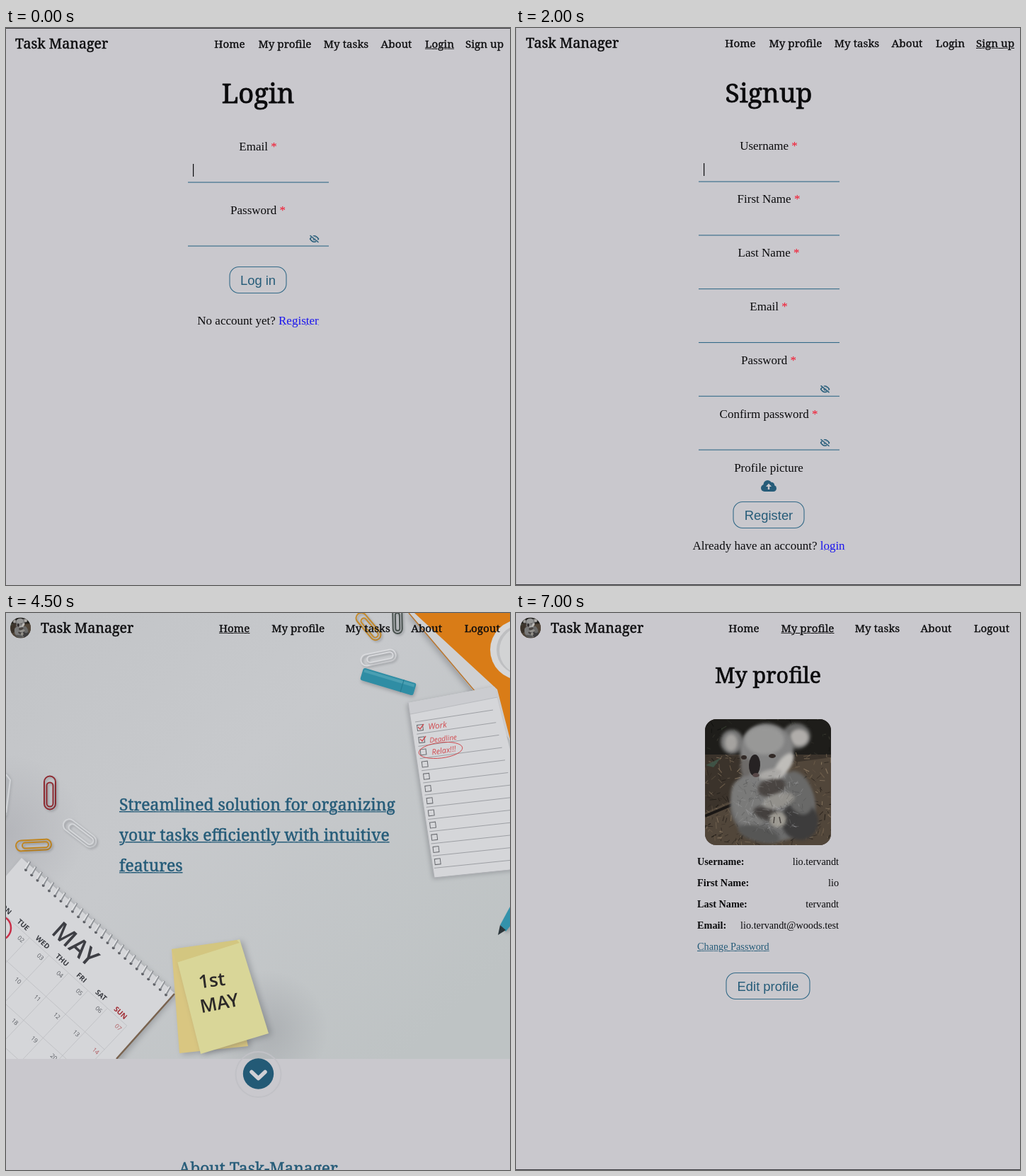
These frames come from a looping animation (712x787 px, 8000 ms). An HTML page with a canvas:

```html
<!DOCTYPE html>
<html lang="en">
<head>
<meta charset="utf-8">
<title>Task Manager</title>
<style>
html, body { margin: 0; width: 100%; height: 100%; overflow: hidden; background: #c9c8cd; }
canvas { display: block; width: 712px; height: 787px; }
</style>
</head>
<body>
<canvas id="stage"></canvas>
<script>
const W = 712, H = 787, LOOP = 8000;
const BG = '#c9c8cd', BLUE = '#265c79', INK = '#0b0b0d', RED = '#f5142c';
const DISPLAY = '"Noto Serif", serif';
const BODY = '"Liberation Serif", "Times New Roman", serif';
const SANS = '"Liberation Sans", Arial, sans-serif';
const HAND = '"Open Sans", sans-serif';

const canvas = document.getElementById('stage');
const ratio = window.devicePixelRatio || 1;
canvas.width = W * ratio;
canvas.height = H * ratio;
const ctx = canvas.getContext('2d');

function rect(x, y, w, h, color) {
  ctx.fillStyle = color;
  ctx.fillRect(x, y, w, h);
}

function trace(points, closed) {
  ctx.beginPath();
  points.forEach(([x, y]) => ctx.lineTo(x, y));
  if (closed) ctx.closePath();
}

function poly(color, ...points) {
  trace(points, true);
  ctx.fillStyle = color;
  ctx.fill();
}

function line(color, width, ...points) {
  trace(points);
  ctx.strokeStyle = color;
  ctx.lineWidth = width;
  ctx.stroke();
}

function oval(color, x, y, rx, ry = rx, turn = 0, stroke = 0) {
  ctx.beginPath();
  ctx.ellipse(x, y, rx, ry, turn, 0, Math.PI * 2);
  if (stroke) {
    ctx.strokeStyle = color;
    ctx.lineWidth = stroke;
    ctx.stroke();
  } else {
    ctx.fillStyle = color;
    ctx.fill();
  }
}

function at(x, y, turn, draw) {
  ctx.save();
  ctx.translate(x, y);
  ctx.rotate(turn);
  draw();
  ctx.restore();
}

function withShadow(blur, dx, dy, draw) {
  ctx.save();
  ctx.shadowColor = 'rgba(60, 62, 70, .3)';
  ctx.shadowBlur = blur * ratio;
  ctx.shadowOffsetX = dx * ratio;
  ctx.shadowOffsetY = dy * ratio;
  draw();
  ctx.restore();
}

// Draws text and returns its width; underlines leave gaps around descenders.
function text(str, x, y, font, { color = INK, align = 'left', underline = 0, behind = BG } = {}) {
  ctx.font = font;
  ctx.textAlign = 'left';
  const width = ctx.measureText(str).width;
  const left = x - (align === 'center' ? width / 2 : align === 'right' ? width : 0);
  if (underline) {
    const top = Math.round(y + .8);
    rect(left, top, width, underline, color);
    ctx.save();
    ctx.beginPath();
    ctx.rect(left, top - .5, width, underline + 1);
    ctx.clip();
    ctx.strokeStyle = behind;
    ctx.lineWidth = 2.5;
    ctx.strokeText(str, left, y);
    ctx.restore();
  }
  ctx.fillStyle = color;
  ctx.fillText(str, left, y);
  if (font.endsWith(DISPLAY)) {
    // The display face is a little heavier than the regular weight.
    ctx.strokeStyle = color;
    ctx.lineWidth = parseFloat(font) * .022;
    ctx.strokeText(str, left, y);
  }
  return width;
}

function turned(str, x, y, turn, font, color) {
  at(x, y, turn, () => text(str, 0, 0, font, { color, align: 'center' }));
}

function rng(seed) {
  return () => (seed = seed * 16807 % 2147483647) / 2147483647;
}

function nav(items, active, y, behind) {
  for (const [label, x] of items) {
    text(label, x, y, '15.2px ' + DISPLAY,
      { align: 'center', underline: label === active ? 1 : 0, behind });
  }
}

function title(str, x, y, size) {
  text(str, x, y, `${size}px ${DISPLAY}`, { align: 'center' });
}

function eyeSlash(x, y) {
  ctx.lineCap = 'round';
  ctx.beginPath();
  ctx.moveTo(x - 6, y);
  ctx.quadraticCurveTo(x, y - 8.5, x + 6, y);
  ctx.quadraticCurveTo(x, y + 8.5, x - 6, y);
  ctx.strokeStyle = BLUE;
  ctx.lineWidth = 1.5;
  ctx.stroke();
  oval(BLUE, x + .3, y, 2.3);
  line(BG, 3, [x - 5, y - 5], [x + 5.5, y + 4]);
  line(BLUE, 1.5, [x - 5.5, y - 4.5], [x + 5.5, y + 4.5]);
  ctx.lineCap = 'butt';
}

function cloud(x, y) {
  oval(BLUE, x - 6, y + 3, 5);
  oval(BLUE, x - 1.5, y - 2, 6);
  oval(BLUE, x + 4, y - 1, 4.2);
  oval(BLUE, x + 6.5, y + 3.5, 4.5);
  rect(x - 6, y, 12.5, 8, BLUE);
  poly(BG, [x, y - 3.5], [x + 4, y + 1], [x - 4, y + 1]);
  rect(x - 1.2, y, 2.4, 5, BG);
}

function button(label, x, y, w) {
  ctx.beginPath();
  ctx.roundRect(x, y, w, 37, 13);
  ctx.strokeStyle = '#336a88';
  ctx.lineWidth = 1.1;
  ctx.stroke();
  text(label, x + w / 2, y + 25, '18.4px ' + SANS, { color: BLUE, align: 'center' });
}

function pair(first, second, x, y, style) {
  const font = '17px ' + BODY;
  ctx.font = font;
  const left = x - ctx.measureText(first + second).width / 2;
  const width = text(first, left, y, font);
  text(second, left + width, y, font, style);
}

function field(label, x, y, secret) {
  pair(label + ' ', '*', x, y, { color: RED });
  rect(x - 99, y + 45, 199, 1.1, '#336a88');
  if (secret) eyeSlash(x + 79.5, y + 35.5);
}

const link = { color: '#1a14ee', underline: 1 };

const guestNav = dx => [['Home', 317 + dx], ['My profile', 395 + dx], ['My tasks', 481.5 + dx],
  ['About', 552.5 + dx], ['Login', 613.5 + dx], ['Sign up', 677 + dx]];
const userNav = dx => [['Home', 322 + dx], ['My profile', 412 + dx], ['My tasks', 510.5 + dx],
  ['About', 593.5 + dx], ['Logout', 672 + dx]];

function brand(x, y) {
  text('Task Manager', x, y, '19.6px ' + DISPLAY);
}

function login() {
  rect(0, 0, W, 1, '#3b3b40');
  brand(13, 29);
  nav(guestNav(-1), 'Login', 28);
  title('Login', 356, 106, 38);
  field('Email', 356, 172.5);
  rect(264, 192, 1.2, 18, INK);
  field('Password', 356, 262.5, true);
  button('Log in', 316, 337.5, 80);
  pair('No account yet? ', 'Register', 356, 418.5, link);
}

function signup() {
  rect(0, 0, 1, H, '#bcbbc1');
  rect(0, H - 1, W, 1, '#3b3b40');
  brand(14, 28);
  nav(guestNav(0), 'Sign up', 27);
  title('Signup', 357, 105, 37.3);
  ['Username', 'First Name', 'Last Name', 'Email', 'Password', 'Confirm password']
    .forEach((label, i) => field(label, 357, 171.5 + i * 75.8, i > 3));
  rect(265, 191, 1.2, 18, INK);
  text('Profile picture', 357, 626.5, '17px ' + BODY, { align: 'center' });
  cloud(357, 647);
  button('Register', 307, 669.5, 100);
  pair('Already have an account? ', 'login', 357, 736.5, link);
}

// A koala sitting on dry grass, in a box of 178 units.
function koala() {
  const rand = rng(77);
  const strokes = (count, colors, spot) => {
    for (let i = 0; i < count; i++) {
      const [x, y] = spot();
      const turn = rand() * 6.28, length = 3 + rand() * 7;
      line(colors[i % colors.length], .4 + rand() * .8,
        [x, y], [x + Math.cos(turn) * length, y + Math.sin(turn) * length]);
    }
  };
  const soften = radius => ctx.filter = `blur(${radius * ratio * ctx.getTransform().a / ratio}px)`;

  rect(0, 0, 178, 178, '#3b332b');
  rect(0, 0, 178, 50, '#1e1d1a');
  poly('#51463a', [118, 62], [178, 54], [178, 178], [0, 178], [0, 132], [60, 105]);
  strokes(420, ['#6d5d4a', '#231e19', '#84735d', '#332b24'], () => [rand() * 178, 52 + rand() * 126]);
  strokes(50, ['#30382b', '#121210', '#403f35'], () => [rand() * 178, rand() * 48]);
  poly('#3f5245', [1, 65], [22, 55], [12, 68]);
  line('#1a1715', 4, [0, 137], [45, 118]);

  soften(2);
  oval('#6c6c6c', 96, 124, 60, 49);
  oval('#7d7d7d', 86, 100, 42, 34);
  oval('#3d3c3c', 134, 144, 26, 27, -.5);
  oval('#7a7a79', 60, 122, 21, 38, -.35);
  oval('#696968', 132, 104, 19, 32, -.35);
  oval('#4a4542', 94, 96, 20, 13, -.3);
  oval('#44403e', 88, 134, 20, 9, .3);
  oval('#93918c', 104, 115, 23, 10, -.25);
  oval('#9d9a92', 103, 142, 12, 11);
  oval('#565655', 76, 162, 30, 11, .25);
  oval('#777777', 38, 32, 16, 17);
  oval('#a5a3a0', 37, 33, 9, 12);
  oval('#6a6a69', 129, 24, 20, 18);
  oval('#b0adaa', 133, 26, 13, 12);
  oval('#838383', 87, 44, 38, 38);
  oval('#989897', 84, 30, 28, 20);
  oval('#bfbdb9', 111, 66, 9, 21, .6);
  oval('#aaa8a5', 92, 78, 17, 7, -.2);
  oval('#6d6a68', 58, 68, 8, 13);
  soften(.7);
  oval('#322a27', 55, 54, 4, 3);
  oval('#322a27', 95, 52, 5, 3);
  oval('#262223', 70, 65, 8, 15, .05);
  oval('#574848', 72, 79, 5, 3);
  line('#4a4542', 1.5, [98, 138], [97, 147]);
  line('#4a4542', 1.5, [105, 138], [107, 147]);
  ctx.filter = 'none';

  ctx.globalAlpha = .3;
  strokes(220, ['#b9babc', '#3c3c3d'], () => {
    const turn = rand() * 6.28, reach = Math.sqrt(rand());
    return [94 + Math.cos(turn) * reach * 50, 119 + Math.sin(turn) * reach * 46];
  });
  ctx.globalAlpha = 1;
}

function portrait(x, y, size, radius) {
  ctx.save();
  ctx.beginPath();
  ctx.roundRect(x, y, size, size, radius);
  ctx.clip();
  ctx.translate(x, y);
  ctx.scale(size / 178, size / 178);
  koala();
  ctx.restore();
}

function clip(x, y, turn, length, width, color) {
  const a = length / 2, b = width / 2;
  withShadow(3, 2, 2, () => at(x, y, turn, () => {
    ctx.strokeStyle = color;
    ctx.lineWidth = 2;
    ctx.beginPath();
    ctx.roundRect(-a, -b, length, width, b);
    ctx.stroke();
    ctx.beginPath();
    ctx.roundRect(-a + 9, -b + 3.5, length - 13, width - 7, b - 3.5);
    ctx.stroke();
  }));
}

function notepad() {
  withShadow(6, -2, 2, () =>
    poly('#d5d6d9', [568, 127], [690, 104], [720, 225], [720, 362], [605, 374]));
  poly('#cbccd0', [568, 127], [690, 104], [694, 119], [571, 143]);
  line('#b9bbbf', 1, [571, 143], [694, 119]);
  line('#aeb0b4', 1.2, [568, 127], [605, 374], [712, 363]);
  for (let i = 0; i < 13; i++) {
    const x = 578 + i * 2.25, y = 154 + i * 17.2;
    line('#8f9196', .8, [x, y], [Math.min(W, x + 110 + i * 2), y - 17 + i * .5]);
    if (i < 12) at(x + 7, y + 8, -.12, () => {
      ctx.strokeStyle = '#66686d';
      ctx.lineWidth = 1;
      ctx.strokeRect(-4, -4, 8, 8);
    });
  }
  const red = '#d0494e';
  line(red, 1.3, [582, 161], [585, 164], [590, 157]);
  line(red, 1.3, [585, 178], [588, 181], [593, 174]);
  turned('Work', 610, 163, -.12, 'italic 11.5px ' + HAND, red);
  turned('Deadline', 618, 181, -.12, 'italic 10px ' + HAND, red);
  turned('Relax!!!', 619, 198, -.15, 'italic 11px ' + HAND, red);
  oval(red, 614, 194, 31, 11, -.12, 1);
}

function calendar() {
  withShadow(8, 3, 3, () =>
    poly('#d5d6d9', [22, 346], [238, 537], [155, 633], [-4, 633], [-4, 376]));
  line('#79634f', 2.5, [238, 538], [156, 630]);
  const turn = .735, step = [27.5, 24.9], drop = [-31.7, 33.5];
  const cell = (x, y, c, r) => [x + c * step[0] + r * drop[0], y + c * step[1] + r * drop[1]];
  for (let i = 0; i < 6; i++) {
    line('#bbbdc1', .8, cell(33, 459, i, 0), cell(33, 459, i, 6));
    line('#bbbdc1', .8, cell(6, 434, -1, i), cell(6, 434, 6, i));
  }
  ['MON', 'TUE', 'WED', 'THU', 'FRI', 'SAT', 'SUN'].forEach((day, i) => {
    const [x, y] = cell(25, 440, i - 1, 0);
    turned(day, x - 3, y + 3, turn, 'bold 10px ' + HAND, day === 'SUN' ? '#a02b32' : '#393b41');
  });
  for (let day = 2; day < 29; day++) {
    const row = Math.floor((day - 1) / 7), column = day - 2 - row * 7;
    const [x, y] = cell(21, 461, column, row);
    turned(String(day).padStart(2, '0'), x - 2, y + 2, turn, '8.5px ' + HAND,
      column === 5 ? '#b05a5e' : '#5a5d63');
  }
  turned('MAY', 90, 477, turn, '600 35px ' + HAND, '#3d3e44');
  oval('#c92f48', -9, 445, 16, 17, 0, 2.5);
  for (let i = 0; i < 25; i++) {
    const x = 31 + i * 8.25, y = 358 + i * 7.35;
    oval('#5d5f65', x - 3, y + 5, 2);
    line('#8d9095', 3.2, [x - 3, y + 4], [x + 3, y - 7]);
    line('#e2e3e5', 1.8, [x - 4, y + 3], [x + 2, y - 7]);
  }
}

function stickyNotes() {
  withShadow(9, 4, 2, () => {
    poly('#d9c681', [234, 475], [310, 466], [342, 612], [245, 622]);
    poly('#d9d698', [241, 488], [330, 461], [371, 594], [275, 623]);
  });
  poly('#d3c680', [234, 475], [326, 462], [330, 466], [241, 494]);
  const ink = '#2c2928';
  turned('1st', 292, 528, -.13, '600 26px ' + HAND, ink);
  turned('MAY', 303, 560, -.19, '600 26px ' + HAND, ink);
}

function shade(x, y, radius, color) {
  const glow = ctx.createRadialGradient(x, y, 0, x, y, radius);
  glow.addColorStop(0, `rgba(${color}, .25)`);
  glow.addColorStop(1, `rgba(${color}, 0)`);
  rect(x - radius, y - radius, radius * 2, radius * 2, glow);
}

function desk() {
  ctx.save();
  ctx.beginPath();
  ctx.rect(0, 0, W, 630);
  ctx.clip();
  const light = ctx.createLinearGradient(0, 0, 560, 630);
  light.addColorStop(0, '#c2c4c7');
  light.addColorStop(.45, '#c7c9cc');
  light.addColorStop(1, '#bec3c4');
  rect(0, 0, W, 630, light);
  shade(370, 590, 85, '110, 112, 120');
  shade(0, 310, 110, '130, 130, 140');

  withShadow(8, -3, 3, () => poly('#cfd0d2', [569, 0], [712, 0], [712, 180], [662, 112]));
  poly('#d97c17', [577, 0], [712, 0], [712, 178], [694, 108]);
  line('#b8742c', 1.5, [569, 0], [662, 110]);
  oval('#d6d6d7', 726.5, 52, 42.5);
  oval('#bebfc1', 728, 52, 35);
  oval('#d2d3d4', 731, 53, 34);

  clip(512, 19, .87, 46, 15, '#c58b2c');
  clip(553, 10, 1.55, 38, 13, '#49534f');
  clip(526, 63, -.2, 50, 16, '#d9dadd');
  clip(62, 254, 1.57, 47, 16, '#8f2b32');
  clip(104, 311, .65, 54, 17, '#d4d6d9');
  clip(39, 328, -.05, 50, 15, '#c08520');
  withShadow(5, 1, 3, () => at(540, 97, .29, () => {
    ctx.beginPath();
    ctx.roundRect(-39, -9, 78, 18, 3);
    ctx.fillStyle = '#2f8da4';
    ctx.fill();
  }));
  at(540, 97, .29, () => {
    rect(-37, -7, 74, 4, '#4a9fb2');
    rect(20, -9, 1, 18, '#237a8f');
  });
  withShadow(5, -1, 2, () => poly('#b3b6ba', [-4, 225], [4, 228], [8, 236], [2, 285], [-4, 292]));
  line('#d2d4d7', 2, [0, 228], [6, 236], [0, 282]);
  withShadow(5, 2, 3, () => poly('#3392ab', [712, 415], [698, 441], [706, 450], [714, 440]));
  poly('#2b363b', [698, 441], [695, 455], [706, 448]);
  notepad();
  calendar();
  stickyNotes();
  ctx.restore();
}

function home() {
  const photo = '#c6c8cb';
  desk();
  portrait(6, 6.5, 29, 14.5);
  brand(49, 28);
  nav(userNav(.7), 'Home', 27, photo);
  ['Streamlined solution for organizing', 'your tasks efficiently with intuitive', 'features']
    .forEach((row, i) => text(row, 160, 279 + i * 43, '22.9px ' + DISPLAY,
      { color: BLUE, underline: 1.5, behind: photo }));
  oval('#c1c1c6', 356.5, 652, 32, 32, 0, 2);
  oval('#235a76', 356.5, 651, 21.7);
  ctx.lineCap = ctx.lineJoin = 'round';
  line('#d0d0d5', 5.5, [347, 648.5], [356.5, 657.5], [366, 648.5]);
  ctx.lineCap = 'butt';
  ctx.lineJoin = 'miter';
  text('About Task-Manager', 356.5, 793, '22.7px ' + DISPLAY, { color: BLUE, align: 'center' });
}

function profile() {
  rect(0, H - 1, W, 1, '#3b3b40');
  portrait(6, 6.5, 29, 14.5);
  brand(49, 28);
  nav(userNav(0), 'My profile', 27);
  title('My profile', 356, 99, 30.4);
  portrait(267, 150, 178, 16);
  [['Username:', 'lio.tervandt'], ['First Name:', 'lio'], ['Last Name:', 'tervandt'],
    ['Email:', 'lio.tervandt@woods.test']].forEach(([label, value], i) => {
    const y = 355.5 + i * 30.2;
    text(label, 256, y, 'bold 14.25px ' + BODY);
    text(value, 456, y, '14.25px ' + BODY, { align: 'right' });
  });
  text('Change Password', 256, 476.3, '14.25px ' + BODY, { color: BLUE, underline: 1 });
  button('Edit profile', 297, 508.5, 118);
}

const scenes = [[0, login], [500, signup], [3000, home], [5500, profile]];
const start = performance.now();
let shown;

function frame() {
  const time = (performance.now() - start) % LOOP;
  const [, scene] = scenes.findLast(([from]) => time >= from);
  if (scene !== shown) {
    shown = scene;
    ctx.setTransform(ratio, 0, 0, ratio, 0, 0);
    rect(0, 0, W, H, BG);
    scene();
  }
  requestAnimationFrame(frame);
}
frame();
</script>
</body>
</html>
```
